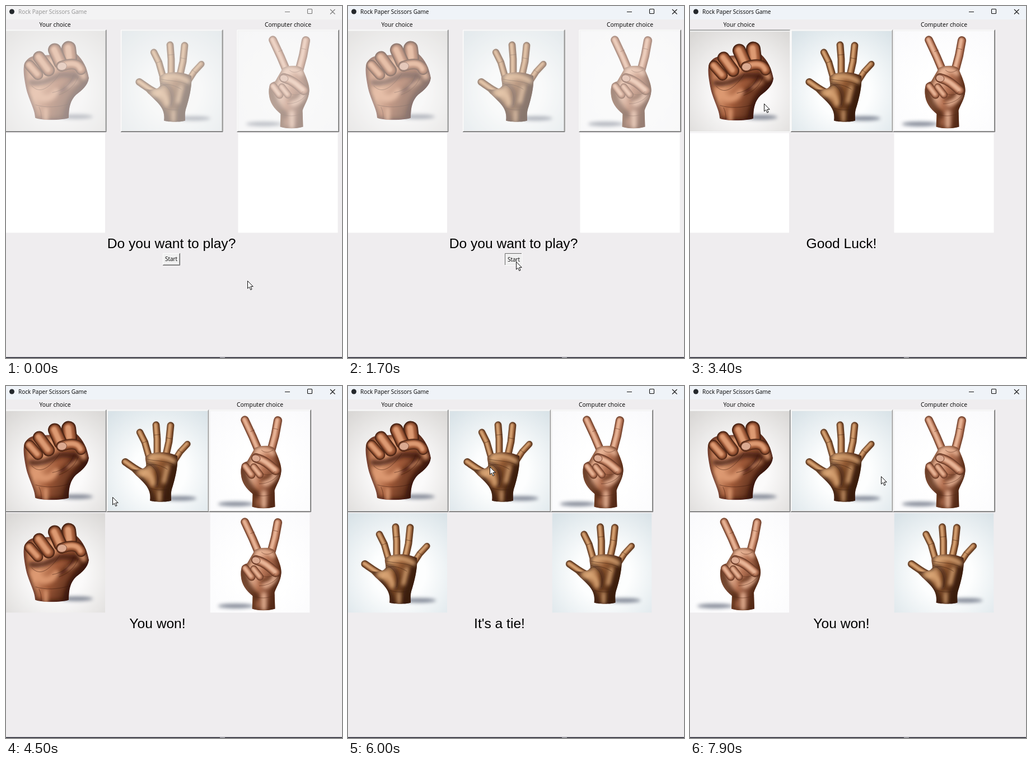
Animation, 600 px wide and 628 px high, one loop 8 s. Source, as an HTML page:

```html
<!DOCTYPE html>
<html lang="en">
<head>
<meta charset="utf-8">
<title>Rock Paper Scissors Game</title>
<style>
html, body { margin: 0; width: 100%; height: 100%; overflow: hidden; background: #efedef; }
svg { display: block; position: absolute; inset: 0; }
text { font-family: "Open Sans", "Noto Sans", sans-serif; fill: #000; text-anchor: middle; }
.big { font: 24.6px "Liberation Sans", Arial, sans-serif; }
</style>
</head>
<body>
<svg id="defs" width="600" height="628"></svg>
<svg id="stage" width="600" height="628" viewBox="0 0 600 628"></svg>
<script>
const LOOP = 8000, STEP = 100;
const skins = {
  rock: { light: '#dd9a72', mid: '#a05a39', dark: '#3a190c' },
  paper: { light: '#d9a575', mid: '#935b34', dark: '#3a1e0e' },
  scissors: { light: '#e9b597', mid: '#b57354', dark: '#552a19' }
};

const line = (d, color, width, extra = '') =>
  `<path d="${d}" fill="none" stroke="${color}" stroke-width="${width}" stroke-linecap="round" stroke-linejoin="round" ${extra}/>`;

// A rounded finger: dark rim, skin, highlight
const tube = (d, width, s) =>
  line(d, s.dark, width) + line(d, s.mid, width * .8, 'filter="url(#soft)"') +
  line(d, s.light, width * .42, 'transform="translate(-1.2,-1)" filter="url(#soft)"');

// Broad soft strokes that model the palm
const shade = (d, s, width) => line(d, s.dark, width, 'opacity=".75" filter="url(#blur)"');
const shine = (d, s, width) => line(d, s.light, width, 'opacity=".9" filter="url(#blur)"');

const creases = (list, s) => list.map(d => line(d, s.dark, 1, 'opacity=".5"')).join('');

const nail = (x, y, rx, ry, angle) =>
  `<ellipse cx="${x}" cy="${y}" rx="${rx}" ry="${ry}" transform="rotate(${angle} ${x} ${y})" fill="#dba990" stroke="#6b3a27" stroke-width=".8"/>`;

const shadow = (x, y, rx, ry) =>
  `<ellipse cx="${x}" cy="${y}" rx="${rx}" ry="${ry}" fill="#434c60" opacity=".65" filter="url(#blur)"/>`;

const palm = (d, id, s, modelling) =>
  `<clipPath id="${id}-clip"><path d="${d}"/></clipPath><g clip-path="url(#${id}-clip)">` +
  `<path d="${d}" fill="url(#${id}-skin)"/>${shade(d, s, 7)}${modelling}</g>`;

function rock(s) {
  return shadow(126, 153, 30, 4) +
    palm('M53 155C53 140 40 120 36 98C33 82 31 68 34 58C40 46 50 44 58 44L126 40C140 52 146 68 149 84C147 98 136 106 126 114C116 124 113 136 113 155C100 160 64 160 53 155Z', 'rock', s,
      shade('M46 92C66 96 84 84 100 78L128 80', s, 10) + shade('M148 94C130 112 116 122 110 156', s, 15) +
      shade('M90 112C104 106 116 96 122 84', s, 6) + shine('M52 108C62 122 78 126 90 108', s, 13) +
      shine('M72 140V158', s, 8) + shine('M130 64L140 82', s, 10) + shine('M112 100L128 90', s, 5)) +
    tube('M113 31L115 48', 26, s) + tube('M88 34L98 56', 24, s) +
    tube('M60 47L77 70', 22, s) + tube('M43 61L58 78', 19, s) +
    tube('M135 69C131 59 120 56 100 63', 19, s) + nail(101, 63, 8.5, 7, -8) +
    creases(['M47 98C60 112 76 106 97 76', 'M84 110C104 106 116 96 122 78', 'M96 114C112 108 124 98 130 82',
      'M54 132C70 137 94 137 114 130', 'M60 136C64 144 64 150 64 157'], s);
}

function paper(s) {
  return shadow(128, 156, 30, 4) +
    tube('M74 84L66 56L57 38', 12, s) + tube('M88 80L88 50L86 25', 12.5, s) +
    tube('M103 82L109 55L112 26', 12.5, s) + tube('M118 90L129 73L142 59', 11, s) +
    tube('M31 91C42 98 50 106 66 112', 13, s) +
    palm('M67 82C74 73 102 70 124 80C126 100 118 128 114 140C112 148 113 152 113 160C104 163 84 163 75 160C77 146 72 136 62 126C54 118 46 112 40 103C50 106 62 105 68 99C69 92 66 88 67 82Z', 'paper', s,
      shade('M60 122C76 142 80 150 80 160', s, 9) + shade('M122 96C116 124 104 142 108 160', s, 16) +
      shade('M74 94C90 100 94 114 86 134', s, 7) + shine('M58 108C72 108 80 118 80 130', s, 9) +
      shine('M76 82C92 78 106 82 118 90', s, 8) + shine('M106 100L100 126', s, 7) + shine('M92 144V160', s, 6)) +
    creases(['M70 86C86 90 102 88 118 96', 'M66 100C80 92 92 96 106 104', 'M70 94C84 98 92 112 88 132',
      'M76 138C88 142 102 142 113 138', 'M62 57L70 54', 'M83 43L93 42', 'M105 48L115 50', 'M126 70L133 75'], s);
}

function scissors(s) {
  return shadow(46, 166, 32, 4) +
    tube('M62 16L76 46L87 72', 14.5, s) + tube('M121 17L116 44L108 74', 15, s) +
    palm('M80 66C90 61 108 60 115 67C122 84 128 96 127 108C126 122 118 132 115 142L116 171C104 175 86 175 75 171L76 148C64 138 56 128 55 112C54 98 58 92 66 90Z', 'scissors', s,
      shade('M60 96C58 118 70 138 84 150', s, 13) + shade('M126 104C118 126 112 140 114 170', s, 10) +
      shade('M78 170L80 146', s, 7) + shade('M92 122L110 116', s, 6) +
      shine('M84 72C94 68 106 68 112 76', s, 9) + shine('M98 130C110 126 114 120 116 114', s, 10) + shine('M96 146V170', s, 9)) +
    tube('M63 99L74 114', 14, s) + tube('M78 100L89 114', 13, s) +
    tube('M117 106C108 98 98 88 82 84', 17, s) + nail(82, 84.5, 7.5, 6, 15) +
    creases(['M88 130C104 130 118 122 124 110', 'M94 112C102 116 110 114 116 108', 'M92 70C98 76 106 74 112 70',
      'M76 148C88 153 102 153 115 147', 'M72 37L79 34', 'M113 31L121 33'], s);
}

const backdrop = (id, center, edge) =>
  `<radialGradient id="${id}-back" cx=".52" cy=".6" r=".75"><stop offset=".35" stop-color="${center}"/><stop offset="1" stop-color="${edge}"/></radialGradient>`;
const skinFill = (id, s) =>
  `<linearGradient id="${id}-skin" x2="1" y2=".5"><stop stop-color="${s.mid}"/><stop offset=".4" stop-color="${s.light}"/><stop offset=".6" stop-color="${s.mid}"/><stop offset="1" stop-color="${s.dark}"/></linearGradient>`;
const picture = (id, draw) =>
  `<symbol id="${id}" viewBox="0 0 178 178"><rect width="178" height="178" fill="url(#${id}-back)"/>${draw(skins[id])}</symbol>`;
const blur = (id, size) =>
  `<filter id="${id}" filterUnits="userSpaceOnUse" x="0" y="0" width="178" height="178"><feGaussianBlur stdDeviation="${size}"/></filter>`;

document.getElementById('defs').innerHTML = '<defs>' + blur('soft', 1.5) + blur('blur', 3) +
  backdrop('rock', '#fbfafa', '#dad8d6') + backdrop('paper', '#fdfefe', '#d9e3e8') + backdrop('scissors', '#ffffff', '#fafafc') +
  Object.entries(skins).map(([id, s]) => skinFill(id, s)).join('') +
  picture('rock', rock) + picture('paper', paper) + picture('scissors', scissors) + '</defs>';

// Pointer stops: time, x, y
const stops = [
  [0, 431, 490], [300, 431, 490], [1500, 300, 456], [2100, 300, 456], [2400, 233, 262],
  [2600, 105, 104], [2800, 232, 184], [2900, 232, 184], [3200, 132, 174], [4100, 132, 174],
  [4500, 190, 198], [4600, 225, 212], [4800, 270, 180], [5000, 253, 144], [6000, 253, 144],
  [6500, 477, 200], [7700, 477, 200], [7800, 395, 157], [7900, 341, 161], [LOOP, 341, 161]
];

// Messages and hands: time, message, player's hand, computer's hand
const rounds = [
  [0, 'Do you want to play?'], [1900, 'Good Luck!'],
  [3500, 'You won!', 'rock', 'scissors'], [5200, "It's a tie!", 'paper', 'paper'],
  [6800, 'You won!', 'scissors', 'paper']
];

function pointer(t) {
  const i = stops.findIndex(s => s[0] > t);
  const [t0, x0, y0] = stops[i - 1], [t1, x1, y1] = stops[i];
  const k = (t - t0) / (t1 - t0);
  const x = x0 + (x1 - x0) * k, y = y0 + (y1 - y0) * k;
  return `<path transform="translate(${x},${y})" d="M.5 .5V14L3.6 11.2L5.8 16.4L8 15.4L5.9 10.4H10.2Z" fill="#fff" stroke="#111" stroke-width="1"/>`;
}

function relief(x, y, w, h, down) {
  const [tl, br, inner] = down ? ['#696969', '#fff', '#e6e6e6'] : ['#fff', '#696969', '#a0a0a0'];
  const r = x + w - .5, b = y + h - .5;
  return `<rect x="${x}" y="${y}" width="${w}" height="${h}" fill="#f0f0f0"/><g fill="none">` +
    `<path d="M${x + .5} ${b}V${y + .5}H${r}" stroke="${tl}"/>` +
    `<path d="M${x + 1} ${b - 1}H${r - 1}V${y + 1}" stroke="${inner}"/>` +
    `<path d="M${x} ${b}H${r}V${y}" stroke="${br}"/></g>`;
}

const image = (id, x, y) => `<use href="#${id}" x="${x}" y="${y}" width="178" height="178"/>`;

function choice(id, x, down, fade) {
  const d = down ? 1 : 0;
  return relief(x - 2, 42.5, 182.5, 182.5, down) + image(id, x + d, 44.5 + d) +
    `<rect x="${x}" y="44.5" width="178" height="178" fill="#f4f3f4" opacity="${fade}"/>`;
}

const slot = (id, x) => id ? image(id, x, 226.5) : `<rect x="${x}" y="226.5" width="178" height="178" fill="#fff"/>`;
const label = (str, x, y, size, extra = '') => `<text x="${x}" y="${y}" font-size="${size}" ${extra}>${str}</text>`;

function titleBar(active) {
  const ink = active ? '#111' : '#777';
  return `<rect width="600" height="24" fill="${active ? '#eff3f8' : '#f3f3f4'}"/>` +
    '<circle cx="10.5" cy="10" r="4.5" fill="#24282c"/>' +
    label('Rock Paper Scissors Game', 22, 14, 10, `style="text-anchor:start;fill:${active ? '#000' : '#929292'}"`) +
    `<path d="M498 10.5H507M538.5 6.5Q538.5 5.5 539.5 5.5H545.5Q546.5 5.5 546.5 6.5V12.5Q546.5 13.5 545.5 13.5H539.5Q538.5 13.5 538.5 12.5ZM579 6L587.5 14.5M587.5 6L579 14.5" fill="none" stroke="${ink}" stroke-width="1.1"/>`;
}

function scene(t) {
  const active = t >= 1600, playing = t >= 1900;
  const gap = playing ? 0 : 25;
  const fade = playing ? 0 : active ? .42 : .52;
  const held = from => t >= from && t < from + 100;
  const [, message, mine, theirs] = rounds.filter(r => r[0] <= t).pop();
  const press = active ? 1 : 0;
  return '<rect width="600" height="628" fill="#efedef"/>' + titleBar(active) +
    label('Your choice', 87.5, 37, 10.45) + label('Computer choice', 453.5 + 2 * gap, 37, 10.45) +
    choice('rock', -1, held(3400), fade) +
    choice('paper', 182 + gap, held(5100), fade) +
    choice('scissors', 364.5 + 2 * gap, held(6700), fade) +
    slot(mine, -1) + slot(theirs, 364.5 + 2 * gap) +
    `<text class="big" x="${270.5 + gap}" y="432">${message}</text>` +
    (playing ? '' : relief(280, 441, 31, 22, press) + label('Start', 295 + press, 455 + press, 10)) +
    '<rect y="626.5" width="600" height="1.5" fill="#1d1d2a"/><rect x="382" y="626.5" width="9" height="1.5" fill="#9a9aa2"/>' +
    pointer(t);
}

const stage = document.getElementById('stage');
let last = -1;
function frame(now) {
  const t = Math.floor(now % LOOP / STEP) * STEP;
  if (t !== last) stage.innerHTML = scene(last = t);
  requestAnimationFrame(frame);
}
frame(0);
</script>
</body>
</html>
```
